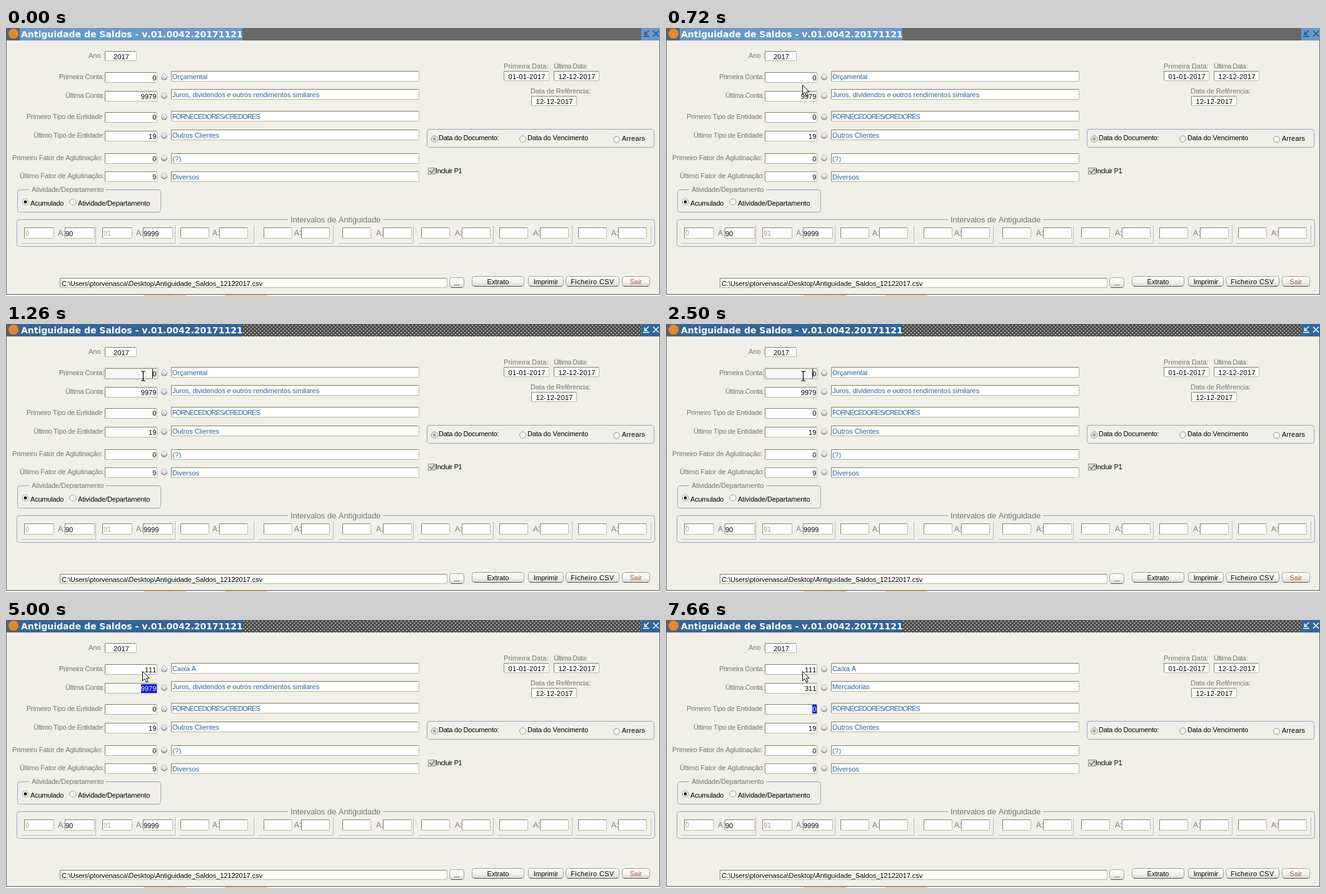
An HTML page that plays this animation: 1046x430 px, repeating every 8000 ms.

```html
<!DOCTYPE html>
<html lang="pt">
<head>
<meta charset="utf-8">
<title>Antiguidade de Saldos</title>
<style>
  html, body { margin: 0; width: 100%; height: 100%; overflow: hidden; background: #f0efe8; }
  svg { display: block; width: 1046px; height: 430px; }
  text {
    font: 11px "Liberation Sans", Arial, sans-serif;
    font-kerning: none;
    fill: #000;
    white-space: pre;
  }
  .label { fill: #77777a; }
  .colon { font-size: 12px; }
  .desc { fill: #2b639c; }
  .dim { fill: #a8a294; }
  .end { text-anchor: end; }
  .mid { text-anchor: middle; }
  .legend { font-size: 13px; fill: #77777a; }
  .title { font: bold 14px "DejaVu Sans", Verdana, sans-serif; font-kerning: none; fill: #fff; }
  .sair { fill: #a4622c; }
  .group { fill: none; stroke: #8fa9c4; }
  .bar { fill: #6699cc; }
  .grip { fill: #686868; }
  .icons { fill: none; stroke: #344a60; stroke-width: 1.5; }
  .active .bar { fill: #336699; }
  .active .grip { fill: url(#dots); }
  .active .icons { stroke: #fff; }
</style>
</head>
<body>
<svg id="stage" viewBox="0 0 1046 430"></svg>
<script>
const stage = document.getElementById('stage');
const parts = [];
const add = s => parts.push(s);

const rect = (x, y, w, h, fill, extra = '') =>
  add(`<rect x="${x}" y="${y}" width="${w}" height="${h}" fill="${fill}" ${extra}/>`);

const text = (x, y, s, cls = '', spacing = 0, id = '') =>
  add(`<text x="${x}" y="${y}" class="${cls}" id="${id}" style="letter-spacing:${spacing}px">${s}</text>`);

function field(x, y, w, h, id = '') {
  rect(x + .5, y + .5, w - 1, h - 1, '#fff', `id="${id}" rx="1" stroke="#b9b998"`);
  add(`<path d="M${x + .5} ${y + h - 1}V${y + .5}H${x + w - 1}" fill="none" stroke="#85855c"/>`);
}

function radio(x, y, fill, dot) {
  add(`<circle cx="${x}" cy="${y}" r="5" fill="${fill}" stroke="#959592"/>`);
  if (dot) add(`<circle cx="${x}" cy="${y}" r="2.5" fill="${dot}"/>`);
}

function ball(x, y) {
  add(`<circle cx="${x}" cy="${y}" r="4.5" fill="url(#ball)" stroke="#b0b0ae"/>`);
  add(`<path d="M${x - 4.5} ${y + 1}A4.6 4.6 0 0 0 ${x + 4.5} ${y + 1}" fill="none" stroke="#777"/>`);
}

function button(x, y, w, h, s, cls = '', spacing = 0) {
  rect(x + .5, y + .5, w - 1, h - 1, 'url(#face)', 'rx="4" stroke="#a3a39d"');
  add(`<path d="M${x + 3} ${y + h - .5}H${x + w - 3}" stroke="#55554f"/>`);
  text(x + w / 2, y + 13, s, 'mid ' + cls, spacing);
}

const group = (x, y, w, h) => rect(x + .5, y + .5, w, h, 'none', 'class="group" rx="4"');

add(`<defs>
  <pattern id="dots" width="6" height="6" patternUnits="userSpaceOnUse">
    <rect width="6" height="6" fill="#4c4c4c"/>
    <path d="M1 1h2v2h-2zM4 4h2v2h-2z" fill="#b0b0ac"/>
  </pattern>
  <linearGradient id="face" x2="0" y2="1">
    <stop stop-color="#fff"/><stop offset=".5" stop-color="#f4f3f0"/><stop offset="1" stop-color="#d8d7d2"/>
  </linearGradient>
  <linearGradient id="ball" x2="0" y2="1">
    <stop stop-color="#fff"/><stop offset="1" stop-color="#c4c4c2"/>
  </linearGradient>
</defs>`);

// Window frame and title bar
rect(0, 0, 1046, 430, '#f0efe8');
rect(0, 0, 1046, 20, '#666', 'class="bar"');
rect(0, 0, 22, 20, '#5c6066');
rect(378, 0, 638, 20, '#686868', 'class="grip"');
add('<circle cx="12" cy="9" r="8" fill="#e08a3c"/>');
text(24, 14.5, 'Antiguidade de Saldos - v.01.0042.20171121', 'title');
add('<path class="icons" d="M1028 4l-6 6M1021.5 5.5v5h5M1019 13.5h10M1035 4.5l9 9M1044 4.5l-9 9"/>');
add('<path d="M.5 20V427M1045.5 20V427" stroke="#66696d"/>');
rect(0, 427, 1046, 1, '#55585c');
rect(0, 428, 1046, 2, '#fbfbf8');
rect(220, 428, 68, 2, '#f6c795');
rect(350, 428, 68, 2, '#f6c795');

// Year
text(132, 48, 'Ano :', 'label');
field(158, 37, 51, 16);
text(172, 50, '2017', '', .1);

// Account rows: label x, label y, label, spacing, field y, value y, value, desc y, desc text y, desc, spacing
const rows = [
  [85, 82, 'Primeira Conta:', -.3, 71, 84, '0', 69, 82, 'Orçamental', -.07],
  [95, 112, 'Última Conta:', -.35, 101, 114, '9979', 98, 111, 'Juros, dividendos e outros rendimentos similares', -.07],
  [33, 146, 'Primeiro Tipo de Entidade', -.25, 135, 147, '0', 133, 146, 'FORNECEDORES/CREDORES', -.87],
  [44, 176, 'Último Tipo de Entidade:', -.3, 165, 178, '19', 163, 176, 'Outros Clientes', -.05],
  [10, 212, 'Primeiro Fator de Aglutinação:', -.15, 201, 214, '0', 201, 214, '(?)', .3],
  [22, 241, 'Último Fator de Aglutinação:', -.13, 230, 243, '9', 230, 243, 'Diversos', 0]
];
rect(156.5, 69.5, 87, 19, '#f0efe8', 'id="hover0" stroke="#cfcfca"');
rect(262.5, 228.5, 400, 20, '#f0efe8', 'id="hover1" stroke="#cfcfca"');
rows.forEach(([lx, ly, label, ls, fy, vy, value, dy, ty, desc, ds], i) => {
  text(lx, ly, label, 'label', ls);
  field(158, fy, 84, 17, 'field' + i);
  add(`<rect id="mark${i}" y="${vy - 11}" height="14" fill="#1414dc"/>`);
  text(240.3, vy, value, 'end', 0, 'value' + i);
  ball(253, fy + 7.5);
  field(264, dy, 397, 17);
  text(266, ty, desc, 'desc', ds, 'desc' + i);
});

// Dates
text(796, 65, 'Primeira Data:', 'label', .1);
text(876, 65, 'Última Data:', 'label', -.55);
text(839, 105, 'Data de Refêrencia:', 'label', -.1);
[[796, 69, '01-01-2017'], [876, 69, '12-12-2017'], [840, 109, '12-12-2017']].forEach(([x, y, s]) => {
  field(x, y, 73, 16);
  text(x + 7.5, y + 13, s, '', .3);
});

// Date choice
group(673, 162, 363, 29);
radio(685, 178, '#ecebe6', '#a3a3a0');
radio(826.5, 178, '#f4f3ef');
radio(976.5, 179, '#f4f3ef');
text(692, 180, 'Data do Documento:', '', -.25);
text(834, 180, 'Data do Vencimento', '', -.15);
text(985, 181, 'Arrears', '', .15);
rect(675.5, 224.5, 11, 10, '#dcdcd8', 'stroke="#8a8a8a"');
add('<path d="M677.5 229l3 3.5 5-6.5" fill="none" stroke="#707070" stroke-width="1.6"/>');
text(687, 233, 'Incluir P1', '', -.35);

// Activity choice
group(18, 259, 229, 36);
rect(37, 257, 122, 6, '#f0efe8');
text(41, 263, 'Atividade/Departamento', 'label', -.13);
radio(31, 279, '#fff', '#111');
radio(107, 279, '#fff');
text(39, 285, 'Acumulado', '', -.2);
text(115, 285, 'Atividade/Departamento', '', -.13);

// Age intervals: panel x, first field x, second field x, "A:" x
group(17, 307, 1020, 43);
rect(451, 304, 152, 8, '#f0efe8');
text(455, 312, 'Intervalos de Antiguidade', 'legend', -.1);
[
  [24, 29, 94, 83], [151, 154, 219, 208], [277, 279, 341, 330], [404, 412, 472, 461],
  [532, 538, 603, 592], [660, 664, 729, 718], [786, 789, 854, 843], [912, 915, 979, 968]
].forEach(([px, a, b, colon], i) => {
  rect(px, 316, 119, 30, '#f1f0ea');
  add(`<path d="M${px} 345.5H${px + 119.5}V317" fill="none" stroke="#bcbcb6"/>`);
  const w = i < 2 ? 48 : 46;
  field(a, 320, w, 18);
  field(b, 320, w, 18);
  text(colon, 333, 'A:', 'label colon');
  text(a + 2, 333, ['0', '91'][i] || '', 'dim');
  text(b + 1, 334, ['90', '9999'][i] || '');
});

// Output path and buttons
field(86, 401, 620, 16);
text(89, 414, 'C:\\Users\\ptorvenasca\\Desktop\\Antiguidade_Saldos_12122017.csv', '', -.06);
button(709, 400, 24, 17, '...');
button(745, 398, 84, 17, 'Extrato');
button(835, 398, 57, 17, 'Imprimir', '', -.05);
button(895, 398, 86, 17, 'Ficheiro CSV', '', .4);
button(985, 398, 45, 17, 'Sair', 'sair');

// Caret and pointers
add('<rect id="caret" width="1"/>');
add('<path id="arrow" d="M.5.5V15.5L4 12.2 6.6 18 9 17 6.5 11.3H11Z" fill="#fff" stroke="#000"/>');
add('<path id="beam" d="M-3.5-7.5H-1L0-6.5 1-7.5H3.5M0-6.5V6.5M-3.5 7.5H-1L0 6.5 1 7.5H3.5" fill="none" stroke="#000" stroke-width="1.2"/>');
stage.innerHTML = parts.join('');

// Each track lists [start ms, ...state]; a state holds until the next one
const LOOP = 8000;
const tracks = {
  pointer: [
    [0], [210, 'arrow', 935, 408], [300, 'arrow', 700, 305], [390, 'beam', 502.5, 217.5],
    [460, 'beam', 405.5, 170.5], [540, 'arrow', 325, 122], [630, 'arrow', 251, 102],
    [720, 'arrow', 218, 91], [790, 'beam', 217.5, 86.5], [870, 'beam', 217.5, 85.5],
    [1020, 'beam', 218.5, 84.5], [1110, 'beam', 219.5, 83.5], [5000, 'arrow', 218, 82]
  ],
  hover: [[0], [390, 1], [460], [790, 0], [5000]],
  focus: [[0], [1260, 0], [5000, 1], [7580, 2]],
  mark: [[0], [5000, 1, 25], [6410], [7660, 2, 7]],
  caret: [
    [0], [1260, 234, 72, 15], [1890], [2500, 234, 72, 15], [2740, 240, 73, 13], [3850],
    [4160, 240, 73, 13], [4770], [6410, 240, 103, 12], [7430]
  ],
  value0: [[0, '0'], [2740, ''], [3050, '1'], [3230, '11'], [4160, '111']],
  value1: [[0, '9979'], [6410, '3'], [6710, '31'], [6800, '311']],
  desc0: [[0, rows[0][9]], [5000, 'Caixa A']],
  desc1: [[0, rows[1][9]], [7580, 'Mercadorias']]
};

const $ = id => document.getElementById(id);
const stateAt = (name, t) => tracks[name].filter(s => s[0] <= t).pop().slice(1);
const show = (id, on) => $(id).setAttribute('visibility', on ? 'visible' : 'hidden');
const set = (id, attrs) => Object.entries(attrs).forEach(([k, v]) => $(id).setAttribute(k, v));

function draw(t) {
  stage.classList.toggle('active', t >= 1260);

  const [kind, px, py] = stateAt('pointer', t);
  for (const id of ['arrow', 'beam']) show(id, id === kind);
  if (kind) set(kind, { transform: `translate(${px} ${py})` });

  const [hover] = stateAt('hover', t);
  for (const i of [0, 1]) show('hover' + i, i === hover);

  const [focus] = stateAt('focus', t);
  const [marked, width] = stateAt('mark', t);
  for (const i of [0, 1, 2]) {
    set('field' + i, { fill: i === focus ? '#f7f7f8' : '#fff' });
    show('mark' + i, i === marked);
    if (i === marked) set('mark' + i, { x: 241 - width, width });
    $('value' + i).style.fill = i === marked ? '#fff' : '';
  }

  const [cx, cy, height] = stateAt('caret', t);
  show('caret', height);
  if (height) set('caret', { x: cx, y: cy, height });

  for (const id of ['value0', 'value1', 'desc0', 'desc1']) $(id).textContent = stateAt(id, t)[0];
}

const start = performance.now();
function tick() {
  draw((performance.now() - start) % LOOP);
  requestAnimationFrame(tick);
}
tick();
</script>
</body>
</html>
```
